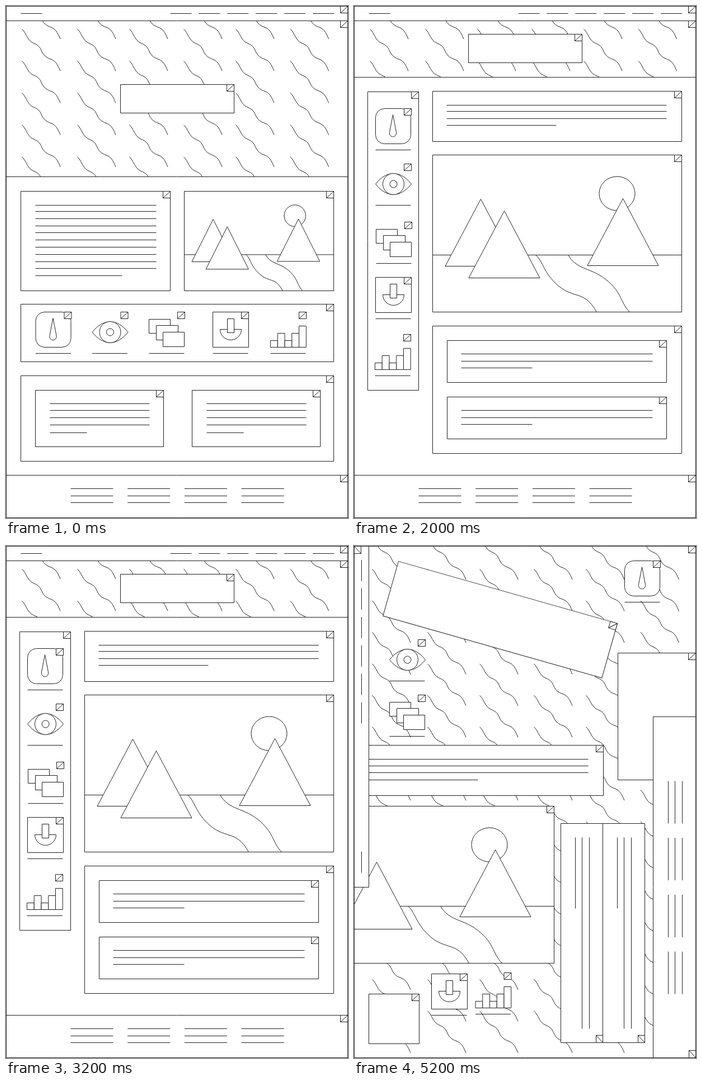
An HTML page with a canvas for the animation above (6000 ms loop, 611 px wide and 916 px high).

```html
<!DOCTYPE html>
<html lang="en">
<head>
<meta charset="utf-8">
<title>Responsive wireframe</title>
<style>
  html, body { margin: 0; width: 100%; height: 100%; overflow: hidden; background: #fff; }
  canvas { display: block; }
</style>
</head>
<body>
<canvas id="stage" width="611" height="916"></canvas>
<script>
const ctx = document.getElementById('stage').getContext('2d');
const W = 610, H = 915, TAG = 13, HOLD = 2000;
const INK = '#231f20', PAPER = '#fff';

// Draws in a shifted, turned coordinate system.
function at(x, y, draw, turn = 0) {
  ctx.save();
  ctx.translate(x, y);
  ctx.rotate(turn);
  draw();
  ctx.restore();
}

function shape(build, filled = true) {
  ctx.beginPath();
  build();
  if (filled) ctx.fill();
  ctx.stroke();
}

const box = (x, y, w, h) => shape(() => ctx.rect(x, y, w, h));
const circle = (x, y, r) => shape(() => ctx.arc(x, y, r, 0, 7));

function line(x1, y1, x2, y2) {
  shape(() => { ctx.moveTo(x1, y1); ctx.lineTo(x2, y2); }, false);
}

function tag(right, top) {
  box(right - TAG, top, TAG, TAG - 1);
  line(right - TAG, top + TAG - 1, right, top);
}

function panel(x, y, w, h) {
  box(x, y, w, h);
  tag(x + w, y);
}

// Rows of placeholder text; the last one is shorter.
function paragraph(x, ys, length, lastLength) {
  ys.forEach((y, i) => line(x, y, x + (i < ys.length - 1 ? length : lastLength), y));
}

function waves(x, y, rowStep, rows) {
  for (const col of [0, 99, 192, 289, 382, 479.5]) {
    for (let row = 0; row < rows; row++) {
      at(x + col, y + row * rowStep, () => shape(() => {
        ctx.moveTo(0, 0);
        ctx.bezierCurveTo(8, 7, 9, 20, 20, 25);
        ctx.bezierCurveTo(32, 30, 32, 33, 37, 43);
        ctx.bezierCurveTo(42, 51, 47, 52, 54, 55);
        ctx.bezierCurveTo(62, 59, 65, 67, 68.5, 75);
      }, false));
    }
  }
}

function hero(bottom, titleTop) {
  ctx.save();
  ctx.beginPath();
  ctx.rect(0, 26, W, bottom - 26);
  ctx.clip();
  waves(28, -16.5, 57.2, 6);
  ctx.restore();
  line(0, bottom, W, bottom);
  tag(W, 26);
  panel(204, titleTop, 203, 51);
}

function nav() {
  box(0, 0, W, 26);
  line(26, 13, 64, 13);
  for (let i = 0; i < 6; i++) line(293 + i * 50.9, 13, 331 + i * 50.9, 13);
  tag(W, 0);
}

function footer() {
  box(0, 0, W, 76);
  for (let i = 0; i < 4; i++) paragraph(115 + i * 101.7, [24, 37, 49], 76, 76);
  tag(W, 0);
}

// Landscape laid out on a 445 x 281 grid and stretched to the panel.
function scene(x, y, w, h) {
  const X = v => x + v * w / 445;
  const Y = v => y + v * h / 281;
  const peak = (px, py) => shape(() => {
    ctx.moveTo(X(px), Y(py));
    ctx.lineTo(X(px + 63.5), Y(py + 120));
    ctx.lineTo(X(px - 63.5), Y(py + 120));
    ctx.closePath();
  });
  const bank = (sx, ...curves) => shape(() => {
    ctx.moveTo(X(sx), Y(179));
    for (const [a, b, c, d, e, f] of curves) {
      ctx.bezierCurveTo(X(a), Y(b), X(c), Y(d), X(e), Y(f));
    }
  }, false);

  box(x, y, w, h);
  line(x, Y(179), x + w, Y(179));
  bank(184, [198, 190, 198, 215, 231, 239], [257, 256, 273, 245, 293, 281]);
  bank(242, [257, 204, 279, 202, 303, 218], [339, 243, 334, 263, 352, 281]);
  shape(() => ctx.ellipse(X(329.5), Y(69), w * 32 / 445, h * 30.5 / 281, 0, 0, 7));
  peak(86, 79);
  peak(128, 100);
  peak(340, 78);
  tag(x + w, y);
}

const icons = {
  gauge() {
    shape(() => ctx.roundRect(0, 0, 63, 63, 16));
    shape(() => {
      ctx.moveTo(31, 11);
      ctx.lineTo(37, 42);
      ctx.bezierCurveTo(38.5, 53, 23.5, 53, 25, 42);
      ctx.closePath();
    });
  },
  eye() {
    shape(() => {
      ctx.moveTo(0, 36);
      ctx.bezierCurveTo(20, 11, 44, 11, 64, 36);
      ctx.bezierCurveTo(44, 61, 20, 61, 0, 36);
    });
    circle(32, 36, 19);
    circle(32, 36, 6.5);
  },
  layers() {
    box(0, 13, 38, 25);
    box(13, 24, 39, 26);
    box(25, 36, 38, 26);
  },
  dial() {
    box(0, 0, 64, 63);
    shape(() => { ctx.arc(32, 31, 19, 0, Math.PI); ctx.closePath(); });
    box(26, 12, 12, 25);
  },
  bars() {
    [12, 25, 12, 25, 38].forEach((h, i) => box(i * 12.75, 63 - h, 12.75, h));
  }
};

function icon(name, x, y) {
  at(x, y, () => {
    icons[name]();
    tag(64, 0);
    line(0, 74, 63, 74);
  });
}

function desktop() {
  hero(305, 140);
  nav();
  panel(26, 331, 267, 178);
  paragraph(52, [356, 367, 380, 393, 405, 418, 431, 444, 457, 469, 482], 216, 155);
  scene(318, 331, 267, 178);

  panel(26, 533, 559, 103);
  icon('gauge', 52.5, 547);
  icon('eye', 153.5, 547);
  icon('layers', 255, 547);
  icon('dial', 369, 547);
  icon('bars', 472, 547);

  panel(26, 661, 559, 153);
  for (const x of [52, 332]) {
    panel(x, 687, 229, 101);
    paragraph(x + 26, [711, 723, 736, 749, 763], 178, 66);
  }
  at(0, 839, footer);
}

function wideCard() {
  panel(0, 0, 392, 75);
  paragraph(25, [24, 37, 49], 342, 127);
}

function tablet() {
  hero(127, 50);
  nav();
  panel(24, 153, 91, 534);
  icon('gauge', 38, 183);
  icon('eye', 38, 282);
  icon('layers', 39, 386);
  icon('dial', 38, 485);
  icon('bars', 37, 587);

  panel(140, 152, 445, 90);
  paragraph(165, [177, 188, 201, 213], 393, 196);
  scene(140, 266, 445, 281);
  panel(140, 572, 445, 228);
  at(166, 598, wideCard);
  at(166, 699, wideCard);
  at(0, 839, footer);
}

function scattered() {
  const quarter = Math.PI / 2;
  waves(32, -15.5, 56.45, 16);
  tag(W, 0);
  at(79, 27, () => panel(0, 0, 406.5, 101.5), Math.atan2(111, 391));
  icon('gauge', 483, 26);
  icon('eye', 63, 167);
  icon('layers', 63, 266);
  icon('dial', 138, 765);
  icon('bars', 216.5, 763);

  panel(471, 191, 139, 227);
  panel(0, 356, 445, 90);
  paragraph(25, [381, 393, 405, 418], 393, 196);
  scene(-88, 465, 445, 281);
  panel(26, 801, 90, 89);
  at(444, 496, wideCard, quarter);
  at(519, 496, wideCard, quarter);
  at(610, 305, footer, quarter);
  at(0, 610, nav, -quarter);
}

const layouts = [desktop, tablet, scattered];

function render(now) {
  const layout = layouts[Math.floor(now / HOLD) % layouts.length];
  ctx.setTransform(1, 0, 0, 1, 0.5, 0.5);
  ctx.fillStyle = PAPER;
  ctx.strokeStyle = INK;
  ctx.lineWidth = 1;
  ctx.fillRect(-1, -1, W + 2, H + 2);
  layout();
  shape(() => ctx.rect(0, 0, W, H), false);
}

const start = performance.now();
function tick() {
  render(performance.now() - start);
  requestAnimationFrame(tick);
}
tick();
</script>
</body>
</html>
```
